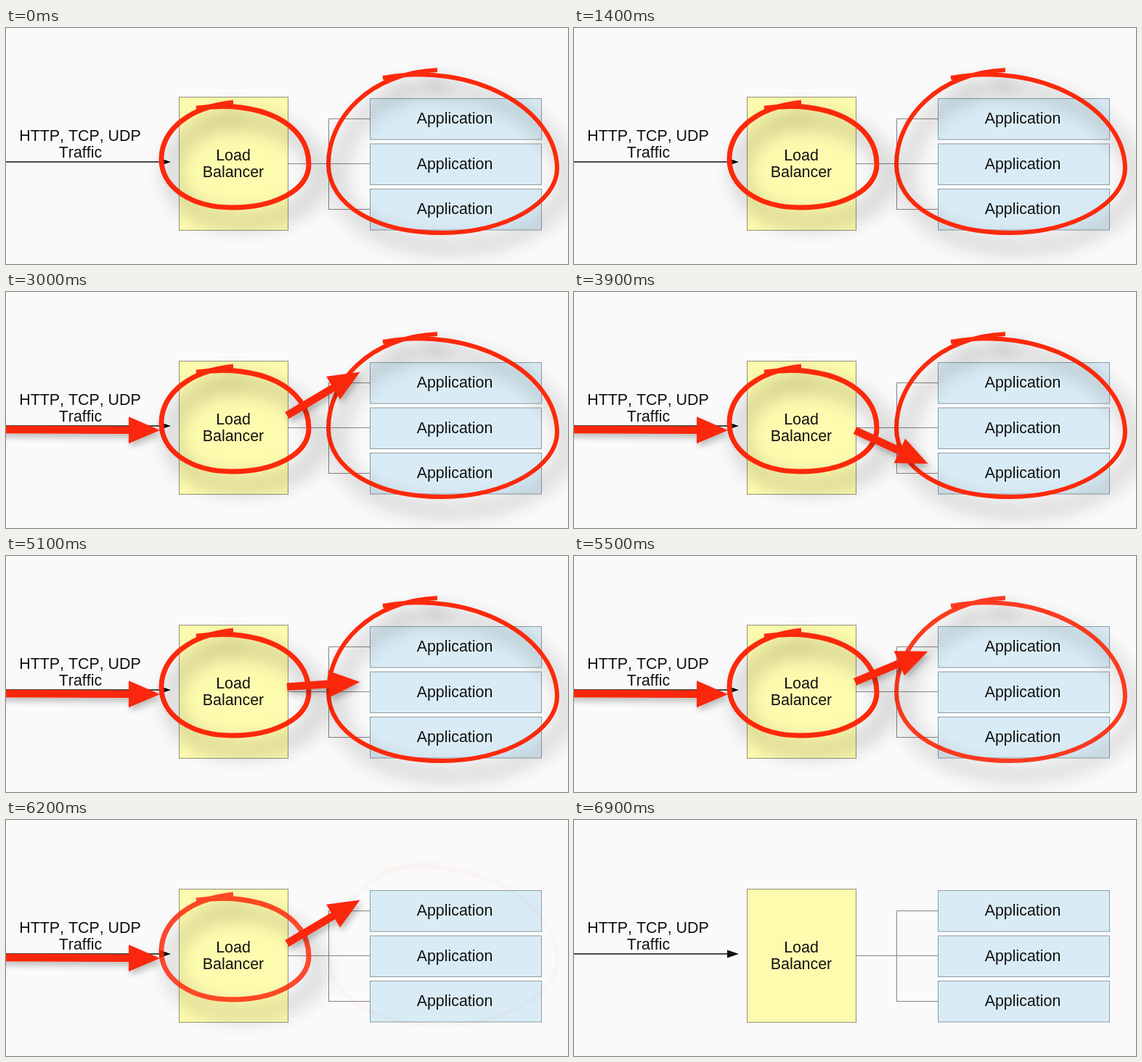
These frames come from a looping animation (774x326 px, 7 s). An HTML page:

```html
<!DOCTYPE html>
<html lang="en">
<head>
<meta charset="utf-8">
<title>Load balancer</title>
<style>
  html, body { margin: 0; width: 100%; height: 100%; overflow: hidden; background: #fafafa; }
  svg { display: block; width: 774px; height: 326px; }
  text { font: 21.4px "Liberation Sans", Arial, sans-serif; font-kerning: none; text-anchor: middle; fill: #111; }
  .balancer { fill: #fdfbae; stroke: #94937a; }
  .app { fill: #d9ecf6; stroke: #8e9ca4; }
  .wire { fill: none; stroke: #858585; }
  .ring { fill: none; stroke: #fd290b; filter: drop-shadow(13px 19px 14px rgba(0, 0, 0, .5)); }
  .arrow { fill: #fb270c; filter: drop-shadow(3px 5px 4px rgba(0, 0, 0, .25)); }
</style>
</head>
<body>
<svg viewBox="0 0 774 326">
  <rect class="balancer" x="238.5" y="95.5" width="150" height="184"/>
  <path class="wire" d="M389 187.5H501M501 125.5H444.5V250.5H501"/>
  <g id="apps"></g>
  <path d="M0 185H214" stroke="#111" stroke-width="1.3"/>
  <path d="M211 179.5L227 185L211 190.5Z" fill="#111"/>
  <text x="102" y="156">HTTP, TCP, UDP</text>
  <text x="102.5" y="179">Traffic</text>
  <text x="313" y="183">Load</text>
  <text x="313" y="206">Balancer</text>
  <path id="ringApps" class="ring" stroke-width="6" d="M519 69C640 46 758 110 759 194C759 240 690 283 600 283C510 283 444 245 444 188C444 125 500 62 594 58"/>
  <path id="ringBalancer" class="ring" stroke-width="7" d="M262 111C350 98 417 132 417 188C417 224 370 248 312 248C252 248 213 218 214 180C215 142 250 109 313 103"/>
  <path id="arrowIn" class="arrow"/>
  <path id="arrowOut" class="arrow"/>
</svg>
<script>
const LOOP = 7000, STEP = 100;
const HEAD = 43;
const el = id => document.getElementById(id);

el('apps').innerHTML = [0, 1, 2].map(i => {
  const y = 97.5 + 62.5 * i;
  return `<rect class="app" x="501.5" y="${y}" width="236" height="56.5"/>
    <text x="618" y="${y + 34.5}">Application</text>`;
}).join('');

// Rises linearly from 0 to 1 between two times.
const ramp = (t, from, to) => Math.min(1, Math.max(0, (t - from) / (to - from)));

// An arrow of which only the part `grown` (0 to 1) is drawn, from its tail on.
function arrowPath(x, y, tipX, tipY, grown) {
  const angle = Math.atan2(tipY - y, tipX - x);
  const ux = Math.cos(angle), uy = Math.sin(angle);
  const length = Math.hypot(tipX - x, tipY - y) * grown;
  const scale = Math.min(1, length / HEAD);
  const neck = length - HEAD * scale, shaft = 5.3 * scale, head = 18.5 * scale;
  const at = (along, side) => `${x + ux * along - uy * side} ${y + uy * along + ux * side}`;
  return 'M' + [
    at(0, -shaft), at(neck, -shaft), at(neck, -head), at(length, 0),
    at(neck, head), at(neck, shaft), at(0, shaft)
  ].join('L') + 'Z';
}

function draw(t) {
  el('ringApps').style.opacity = 1 - ramp(t, 5430, 6220);
  el('ringBalancer').style.opacity = 1 - ramp(t, 6080, 6880);

  const arrowOpacity = 1 - ramp(t, 6300, 6850);
  el('arrowIn').style.opacity = el('arrowOut').style.opacity = arrowOpacity;
  el('arrowIn').setAttribute('d', arrowPath(-25, 190, 212, 191, ramp(t, 1700, 2100)));

  // The outgoing arrow aims at application 0, then 2, 1 and 0 again.
  const aim = 2 * ramp(t, 3300, 4000) - ramp(t, 4100, 4900) - ramp(t, 5000, 5700);
  el('arrowOut').setAttribute('d',
    arrowPath(387, 170.5 + 12 * aim, 487.5, 110.5 + 74 * aim, ramp(t, 2500, 3000)));
}

const start = performance.now();
function tick() {
  const time = (performance.now() - start) % LOOP;
  draw(Math.floor(time / STEP) * STEP);
  requestAnimationFrame(tick);
}
tick();
</script>
</body>
</html>
```
